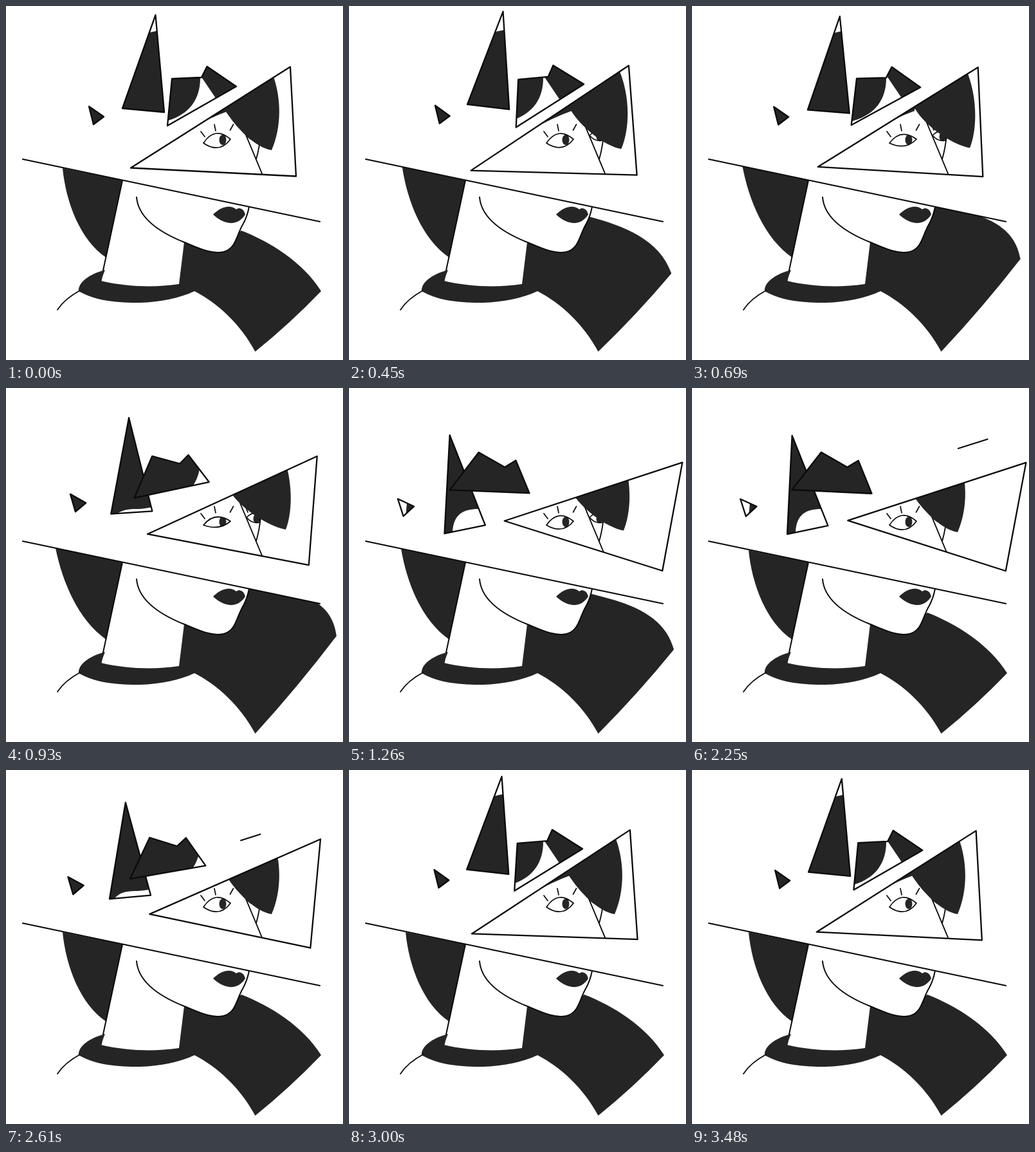
An HTML page with a canvas for the animation above (3.51 s loop, 524 px wide and 550 px high).

```html
<!DOCTYPE html>
<html lang="en">
<head>
<meta charset="utf-8">
<title>Shattered portrait</title>
<style>
html, body { margin: 0; width: 100%; height: 100%; overflow: hidden; background: #fff; }
canvas { display: block; }
</style>
</head>
<body>
<canvas id="stage" width="524" height="550"></canvas>
<script>
const ctx = document.getElementById('stage').getContext('2d');
const LOOP = 3510, STEP = 30;
const OUT_START = 30, BACK_START = 1797, MOVE = 1740;
const INK = '#252525', LINE = '#0a0a0a';

// Each shard: corners at rest on the right, then at rest on the left.
const shards = [
  { from: [[194, 251.5], [442, 94.5], [451, 264.5]],
    to: [[238, 210], [512.5, 114], [484.5, 282.5]] },
  { from: [[232.5, 14], [246, 165], [181, 159]],
    to: [[162.5, 68.5], [214.5, 209.5], [151, 221]] },
  { from: [[258, 113], [304, 111], [312.5, 94], [358, 125], [251, 186]],
    to: [[206, 101], [247, 122], [263.5, 111], [286.5, 160.5], [164, 160.5]] },
  { from: [[129, 156], [152, 172], [136, 184]],
    to: [[80, 171], [105, 183], [88.5, 198]] }
];

const mix = (a, b, k) => a + (b - a) * k;
const clamp = x => Math.max(0, Math.min(1, x));
const easeSine = x => (1 - Math.cos(Math.PI * clamp(x))) / 2;

function easeInOutBack(x) {
  const c = 2.595;
  const half = v => v * v * ((c + 1) * v - c) / 2;
  return x < 0.5 ? half(2 * x) : 1 - half(2 - 2 * x);
}

function fill(d, color = INK) {
  ctx.fillStyle = color;
  ctx.fill(new Path2D(d));
}

function stroke(d, width = 2) {
  ctx.strokeStyle = LINE;
  ctx.lineWidth = width;
  ctx.stroke(new Path2D(d));
}

function eye(outline, x, y, rx, ry) {
  const shape = new Path2D(outline);
  ctx.save();
  ctx.clip(shape);
  ctx.fillStyle = INK;
  ctx.beginPath();
  ctx.ellipse(x, y, rx, ry, 0, 0, 7);
  ctx.fill();
  ctx.restore();
  stroke(outline, 1.7);
}

// The hidden upper portrait, seen only through the shards.
function drawHead(sway) {
  const s = (a, b) => mix(a, b, sway);
  const squint = sway ** 3;
  fill('M86 260C86 235 86 212 89 190C94 110 150 55 240 37.5C285 48 302 85 302 112' +
       'C302 145 285 168 252 178C236 184 220 187 205 188C180 187 162 194 161 225V260Z');
  fill('M286 191Q316 174 346 163V148H329L286 188Z');
  stroke('M303 195L309 203M324 184L326 194M353.5 184L348.5 193', 1.7);
  eye(`M307 213Q325 ${mix(186, 191, squint)} 349 207Q332 ${mix(230, 222, squint)} 307 213Z`,
      337, 208, 5.5, 8);
  eye('M374 201Q384 191 396 195L394 209Q382 211 374 201Z', 389.5, 203, 5, 7);
  stroke('M373 186L376 193', 1.7);
  stroke('M362 174L400 265M396 200Q394 221 389 238', 1.9);
  fill(`M303 109L328 146L${s(340, 349)} 161` +
       `C${s(358, 362)} ${s(190, 184)} ${s(388, 405)} ${s(220, 214)} ${s(413, 435)} ${s(224, 220)}` +
       `C${s(430, 447)} ${s(185, 190)} ${s(430, 447)} 130 ${s(405, 422)} 85L312 80Z`);
}

function drawBust(sway) {
  const s = (a, b) => mix(a, b, sway);
  ctx.save();
  ctx.clip(new Path2D('M0 232.5L524 342.6V550H0Z'));

  // Hair blowing to the right of the neck
  const tipX = s(490, 514), tipY = s(443, 385);
  fill(`M277 367L269 432L250 455L293 443C330 462 365 495 387.5 537` +
       `Q${(tipX + 388) / 2 + 3} ${(tipY + 537) / 2 + 3} ${tipX} ${tipY}` +
       `C${s(462, 507)} ${s(398, 325)} ${s(410, 450)} ${s(366, 315)} ${s(366, 378)} ${s(349, 302)}L340 365Z`);

  const jaw = 'M203 297C206 333 247 355 277 367C300 376 318 386 338 382C358 377 358 356 369 338Q375 327 378 312';
  fill(jaw + 'L203 270Z', '#fff');
  stroke(jaw, 2);

  fill(`M${s(88, 77)} ${s(252, 249)}C${s(93, 88)} ${s(305, 302)} ${s(116, 112)} ${s(365, 360)} 156 391L181 271Z`);
  stroke('M181 271L147.5 427', 2);
  fill('M154 410C128 417 112 430 113 443C140 459 175 461 208 461C240 460 270 454 293 443' +
       'L269 432C230 438 185 436 147.5 427Z');
  stroke('M80 472Q91 455 115 442', 1.8);
  fill('M322 324C332 314 347 307 358 316C363 312 370 315 372 324C362 340 343 343 322 324Z');
  ctx.restore();
  stroke('M26 238L488 335', 2.2);
}

function drawShard({ from, to }, q, sway) {
  const corners = from.map(([x, y], i) => `${mix(x, to[i][0], q)} ${mix(y, to[i][1], q)}`);
  const d = `M${corners.join('L')}Z`;
  fill(d, '#fff');
  ctx.save();
  ctx.clip(new Path2D(d));
  drawHead(sway);
  ctx.restore();
  stroke(d, 2.3);
}

function drawStreak(t) {
  const at = start => mix(485, 362, easeSine((t - start) / 1030));
  const head = at(1683), tail = at(1941);
  if (tail - head < 0.5) return;
  const y = x => 94 - 0.316 * (x - 414);
  stroke(`M${head} ${y(head)}L${tail} ${y(tail)}`, 2);
}

function draw(now) {
  const t = Math.floor((now % LOOP) / STEP) * STEP;
  const out = clamp((t - OUT_START) / MOVE);
  const back = clamp((t - BACK_START) / MOVE);
  const q = easeInOutBack(out) - easeInOutBack(back);
  const sway = Math.sin(Math.PI * out) ** 2;

  ctx.fillStyle = '#fff';
  ctx.fillRect(0, 0, 524, 550);
  ctx.lineCap = ctx.lineJoin = 'round';
  drawBust(sway);
  shards.forEach(shard => drawShard(shard, q, sway));
  drawStreak(t);
}

let begin;
function tick(now) {
  begin ??= now;
  draw(now - begin);
  requestAnimationFrame(tick);
}
draw(0);
requestAnimationFrame(tick);
</script>
</body>
</html>
```
